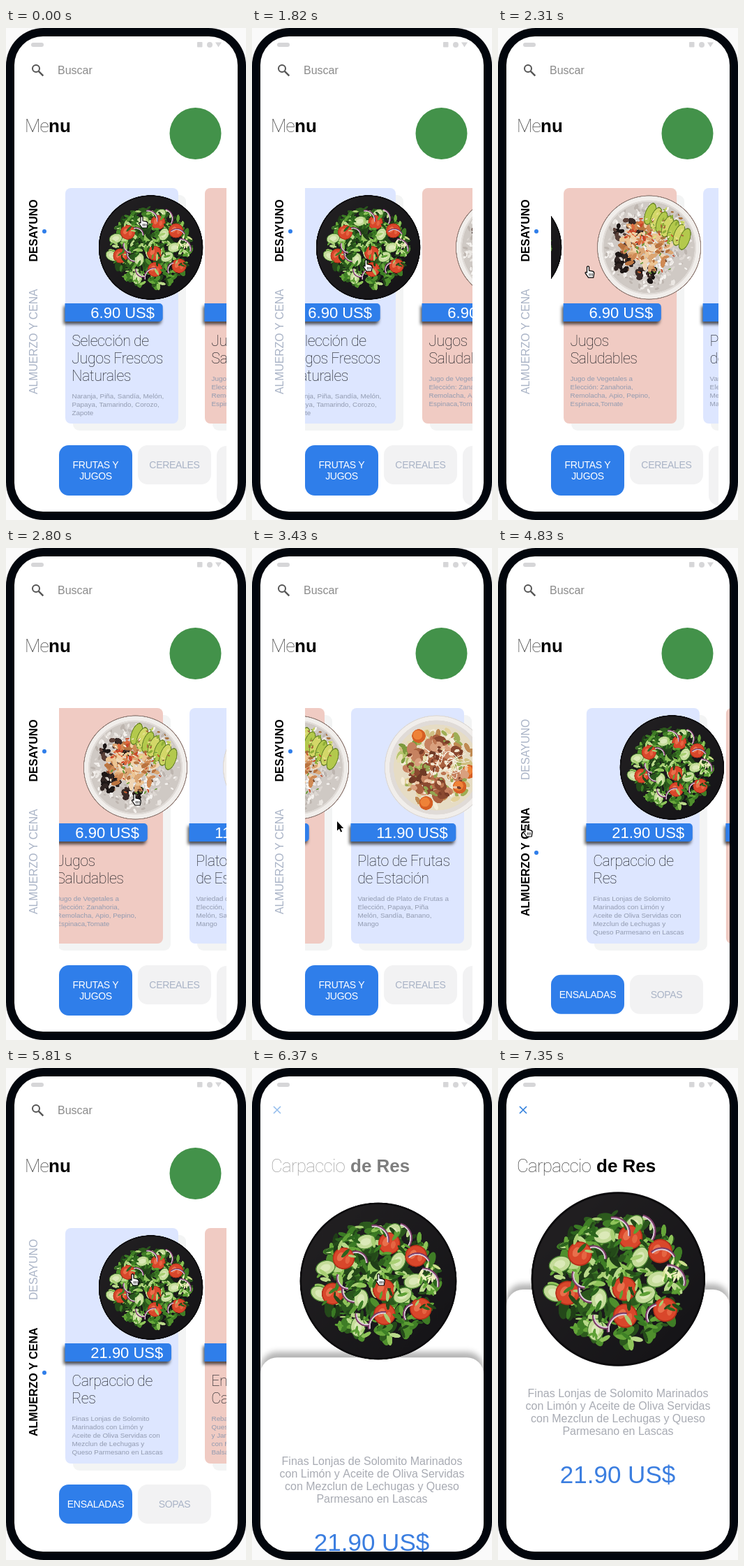
These frames come from a looping animation (344x704 px, 7420 ms). An HTML page with a canvas:

```html
<!DOCTYPE html>
<html lang="es">
<head>
<meta charset="utf-8">
<style>
html, body { margin: 0; width: 100%; height: 100%; overflow: hidden; background: #fff; }
canvas { display: block; width: 344px; height: 704px; }
</style>
</head>
<body>
<canvas id="stage"></canvas>
<script>
const LOOP = 7420, STEP = 70;
const SANS = '"Liberation Sans", Arial, sans-serif';
const THIN = 'Roboto, "Liberation Sans", sans-serif';
const BLUE = '#2f7eea', MUTED = '#a9b3c6', SKY = '#dde6ff', ROSE = '#f0cbc3';

const stage = document.getElementById('stage');
const dpr = window.devicePixelRatio || 1;
stage.width = 344 * dpr;
stage.height = 704 * dpr;
const ctx = stage.getContext('2d');

// ---------- helpers ----------
const clamp = v => Math.max(0, Math.min(1, v));
const mix = (a, b, p) => a + (b - a) * p;
const easeOut = p => 1 - (1 - clamp(p)) ** 3;

// Monotone curve through [time, value] points.
function curve(pts, t) {
  const last = pts.length - 1;
  if (t <= pts[0][0]) return pts[0][1];
  if (t >= pts[last][0]) return pts[last][1];
  const rate = i => (pts[i + 1][1] - pts[i][1]) / (pts[i + 1][0] - pts[i][0]);
  const slope = i => {
    if (i === 0 || i === last) return 0;
    const a = rate(i - 1), b = rate(i);
    return a * b <= 0 ? 0 : 2 * a * b / (a + b);
  };
  let i = 0;
  while (pts[i + 1][0] < t) i++;
  const w = pts[i + 1][0] - pts[i][0], u = (t - pts[i][0]) / w;
  return mix(pts[i][1], pts[i + 1][1], u * u * (3 - 2 * u)) +
    w * u * (1 - u) * ((1 - u) * slope(i) - u * slope(i + 1));
}

function random(seed) {
  return () => (seed = (seed * 16807) % 2147483647) / 2147483647;
}

function disc(g, x, y, r, fill) {
  g.fillStyle = fill;
  g.beginPath();
  g.arc(x, y, r, 0, 7);
  g.fill();
}

function blob(g, x, y, rx, ry, turn, fill) {
  g.fillStyle = fill;
  g.beginPath();
  g.ellipse(x, y, rx, ry, turn, 0, 7);
  g.fill();
}

function arc(g, x, y, r, from, to, color, width) {
  g.strokeStyle = color;
  g.lineWidth = width;
  g.beginPath();
  g.arc(x, y, r, from, to);
  g.stroke();
}

function box(x, y, w, h, r, fill) {
  ctx.fillStyle = fill;
  ctx.beginPath();
  ctx.roundRect(x, y, w, h, r);
  ctx.fill();
}

function text(str, x, y, font, fill, align = 'left', spacing = '0px') {
  ctx.font = font;
  ctx.fillStyle = fill;
  ctx.textAlign = align;
  ctx.letterSpacing = spacing;
  ctx.fillText(str, x, y);
}

function layer(alpha, draw) {
  if (alpha <= 0) return;
  ctx.save();
  ctx.globalAlpha *= Math.min(1, alpha);
  draw();
  ctx.restore();
}

// ---------- dishes, drawn once in a circle of radius 100 ----------
function makeDish(paint, seed) {
  const c = document.createElement('canvas');
  c.width = c.height = 500;
  const g = c.getContext('2d');
  g.translate(250, 250);
  g.scale(2.5, 2.5);
  g.lineCap = 'round';
  const rnd = random(seed);
  const pick = list => list[Math.floor(rnd() * list.length)];
  const scatter = (n, x, y, spread, size, flat, colors) => {
    for (let i = 0; i < n; i++) {
      const a = rnd() * 6.283, d = Math.sqrt(rnd()) * spread, s = size * (.6 + rnd() * .7);
      blob(g, x + Math.cos(a) * d, y + Math.sin(a) * d, s, s * flat, rnd() * 3.14, pick(colors));
    }
  };
  paint(g, rnd, scatter);
  return c;
}

function paintSalad(g, rnd, scatter) {
  const rim = g.createLinearGradient(-70, -70, 70, 70);
  rim.addColorStop(0, '#211f21');
  rim.addColorStop(1, '#161518');
  disc(g, 0, 0, 99.8, '#0c0b0d');
  disc(g, 0, 0, 97.5, rim);
  scatter(110, 0, 0, 74, 10, .5, ['#2c5a1d', '#3f7d26', '#24481a', '#4f8f2d']);
  scatter(190, 0, 0, 77, 7, .4, ['#3a7a24', '#66a63a', '#8fc45a', '#2a551d', '#b9d98a', '#1f3d17']);
  const slices = [[-16, -50], [25, -25], [-67, -17], [-74, 16], [-22, 23], [31, 18], [45, 0], [-26, 58], [18, -62]];
  for (const [x, y] of slices) {
    const turn = rnd() * 3;
    blob(g, x, y, 13, 9.5, turn, '#4c8532');
    blob(g, x, y, 11.8, 8.4, turn, '#c5dc9a');
    blob(g, x, y, 6.5, 4.5, turn, '#dbe9b8');
  }
  const tomatoes = [[14, -48], [-44, -29], [7, 11], [-58, 16], [54, 35], [8, 42], [48, -32]];
  for (const [x, y] of tomatoes) {
    disc(g, x, y, 14, '#b5301a');
    disc(g, x, y, 12.6, '#d9472b');
    blob(g, x - 4, y - 2, 4, 6, .5, '#e8704c');
    blob(g, x + 5, y + 2, 3, 5, .2, '#e56542');
  }
  scatter(95, 0, 0, 76, 6, .32, ['#3d8026', '#5da035', '#2c641e', '#a9cf74', '#244a19']);
  scatter(16, 66, -6, 16, 5, .3, ['#eef0bd', '#cfe08f']);
  for (let i = 0; i < 10; i++) {
    const a = i * .628 + rnd() * .3, d = 32 + rnd() * 34, from = rnd() * 6;
    const x = Math.cos(a) * d, y = Math.sin(a) * d, r = 14 + rnd() * 7;
    arc(g, x, y, r, from, from + 1.8, '#7b3a66', 1.8);
    arc(g, x, y, r - 1.5, from, from + 1.8, '#dccbd8', 1.6);
  }
}

function paintPlate(g, edge) {
  disc(g, 0, 0, 99.5, edge);
  disc(g, 0, 0, 98, '#f1eeeb');
  disc(g, 0, 0, 90, '#e0dbd7');
}

function paintRice(g, rnd, scatter) {
  paintPlate(g, '#8d7871');
  disc(g, 0, 0, 87, '#cfc9c4');
  scatter(330, 0, 0, 83, 4.5, .5, ['#ebe7e3', '#ddd7d2', '#bdb5af', '#f4f1ee']);
  scatter(34, -40, -26, 27, 5.5, .75, ['#1d1716', '#3a2a27', '#5a4038']);
  scatter(26, -50, 28, 17, 5.5, .75, ['#1d1716', '#302523']);
  scatter(22, -6, 50, 18, 5.5, .75, ['#1d1716', '#3a2a27']);
  scatter(120, -4, -4, 48, 8, .45, ['#dba673', '#ecc493', '#cf8a54', '#f0d6b4', '#b9733f']);
  scatter(28, -22, -26, 24, 5, .5, ['#c9462a', '#dd6a3d', '#f0cfa6']);
  for (let i = 0; i < 7; i++) {
    const x = 2 + i * 11, y = -64 + i * 8;
    blob(g, x, y, 10, 22, .35, '#6f8a2c');
    blob(g, x, y, 8.5, 20, .35, i % 2 ? '#d3d768' : '#b3c94c');
  }
  scatter(40, 36, -40, 34, 3.5, .5, ['#8fae38', '#e2df86', '#a9713c', '#c3d25c']);
  scatter(60, 0, 0, 58, 3, .4, ['#6c9a3d', '#c9502f', '#f8ecd6', '#7a4a2c']);
}

function paintPoke(g, rnd, scatter) {
  paintPlate(g, '#dcd8d5');
  disc(g, 0, 0, 82, '#e6dcc4');
  scatter(110, 0, 0, 74, 8, .5, ['#e3d19a', '#f4ecd8', '#9fae55', '#d0c083', '#c08a52']);
  scatter(30, -46, -26, 26, 8, .5, ['#7d9a3e', '#b6c56d', '#e7dfb4']);
  for (const [x, y] of [[44, 37], [-20, 68], [-34, -60], [62, 8]]) {
    disc(g, x, y, 13, '#d65f24');
    disc(g, x - 2, y - 2, 9, '#ee8238');
  }
  scatter(60, -6, 0, 56, 11, .75, ['#a9603f', '#c68260', '#8a4930', '#d9a07e', '#6f3a26']);
  scatter(90, -2, 2, 60, 4.5, .6, ['#bd7652', '#7a3d28', '#ecc3a2', '#93a550', '#f1e6cf']);
  g.strokeStyle = '#f8f3e6';
  g.lineWidth = 1.3;
  for (let i = 0; i < 30; i++) {
    const x = rnd() * 60 - 20, y = rnd() * 50 - 32;
    g.beginPath();
    g.moveTo(x, y);
    g.quadraticCurveTo(x + 8, y - 14 + rnd() * 28, x + rnd() * 44 - 14, y + rnd() * 30 - 15);
    g.stroke();
  }
}

const salad = makeDish(paintSalad, 71);
const rice = makeDish(paintRice, 23);
const poke = makeDish(paintPoke, 47);

function drawDish(img, x, y, r) {
  ctx.drawImage(img, x - r, y - r, r * 2, r * 2);
}

// ---------- content ----------
const breakfast = [
  { bg: SKY, dish: salad, price: '6.90 US$', title: ['Selección de', 'Jugos Frescos', 'Naturales'],
    desc: ['Naranja, Piña, Sandía, Melón,', 'Papaya, Tamarindo, Corozo,', 'Zapote'] },
  { bg: ROSE, dish: rice, price: '6.90 US$', title: ['Jugos', 'Saludables'],
    desc: ['Jugo de Vegetales a', 'Elección: Zanahoria,', 'Remolacha, Apio, Pepino,', 'Espinaca,Tomate'] },
  { bg: SKY, dish: poke, price: '11.90 US$', title: ['Plato de Frutas', 'de Estación'],
    desc: ['Variedad de Plato de Frutas a', 'Elección, Papaya, Piña', 'Melón, Sandía, Banano,', 'Mango'] }
];
const lunch = [
  { bg: SKY, dish: salad, price: '21.90 US$', title: ['Carpaccio de', 'Res'],
    desc: ['Finas Lonjas de Solomito', 'Marinados con Limón y', 'Aceite de Oliva Servidas con',
      'Mezclun de Lechugas y', 'Queso Parmesano en Lascas'] },
  { bg: ROSE, dish: rice, price: '18.90 US$', title: ['Ensalada', 'Caprese'],
    desc: ['Rebanadas de Tomate,', 'Queso Mozzarella', 'y Jardín de Albahaca', 'con Reducción de', 'Balsámico'] }
];

function drawCard(c, x, showDish) {
  box(x + 11, 239, 162, 337, 9, 'rgba(30,40,50,.05)');
  box(x, 229, 162, 337, 8, c.bg);
  if (showDish) drawDish(c.dish, x + 122.5, 314, 75);

  ctx.font = '22px ' + SANS;
  ctx.letterSpacing = '0px';
  const w = ctx.measureText(c.price).width + 48;
  ctx.save();
  ctx.shadowColor = 'rgba(0,0,0,.65)';
  ctx.shadowBlur = 4 * dpr;
  ctx.shadowOffsetX = -2 * dpr;
  ctx.shadowOffsetY = 4 * dpr;
  box(x - .5, 394, w + .5, 26, [0, 5, 5, 0], BLUE);
  ctx.restore();
  text(c.price, x + 36.3, 415, '22px ' + SANS, '#fff');

  c.title.forEach((s, i) => text(s, x + 9.3, 455 + i * 25, '200 21.5px ' + THIN, '#15171c', 'left', '-0.5px'));
  const top = 455 + c.title.length * 25;
  c.desc.forEach((s, i) => text(s, x + 9.5, top + i * 12, '9.9px ' + SANS, '#929bb0'));
}

function drawCarousel(cards, shift, scroll, hideFirst) {
  ctx.save();
  ctx.beginPath();
  ctx.rect(76 + shift, 220, 240, 364);
  ctx.clip();
  cards.forEach((c, i) => {
    const x = 85 + i * 200 + shift - scroll;
    if (x < 344 && x > -180) drawCard(c, x, !(hideFirst && i === 0));
  });
  ctx.restore();
}

function drawChip(x, y, h, lines, active) {
  box(x, y, 105, h, 14, active ? BLUE : '#f2f2f3');
  lines.forEach((s, i) => text(s, x + 52.5, y + h / 2 + 5 + (i - (lines.length - 1) / 2) * 16,
    '14px ' + SANS, active ? '#fff' : MUTED, 'center', '-0.3px'));
}

function drawBreakfastChips() {
  ctx.save();
  ctx.beginPath();
  ctx.rect(75, 590, 241, 102);
  ctx.clip();
  drawChip(76, 597, 72, ['FRUTAS Y', 'JUGOS'], true);
  drawChip(189, 597, 56, ['CEREALES'], false);
  drawChip(302, 598, 85, [], false);
  ctx.restore();
}

function drawLunchChips(drop) {
  drawChip(76, 596 + drop, 56, ['ENSALADAS'], true);
  drawChip(189, 596 + drop, 56, ['SOPAS'], false);
}

function sideLabel(str, y, active) {
  ctx.save();
  ctx.translate(44.5, y);
  ctx.rotate(-Math.PI / 2);
  text(str, 0, 0, (active ? 'bold 16px ' : '15.75px ') + SANS, active ? '#000' : MUTED);
  ctx.restore();
}

function drawSide(onLunch) {
  sideLabel('DESAYUNO', onLunch ? 332 : 334.5, !onLunch);
  sideLabel('ALMUERZO Y CENA', onLunch ? 527 : 524, onLunch);
  disc(ctx, 55, onLunch ? 436 : 291, 3, BLUE);
}

function heading(thin, bold, boldX) {
  text(thin, 27, 149, '100 26px ' + THIN, '#3c3c3c', 'left', '-0.8px');
  text(bold, boldX, 149, 'bold 26px ' + SANS, '#000');
}

function drawHeader() {
  arc(ctx, 43, 58, 5, 0, 7, '#555', 2);
  ctx.beginPath();
  ctx.moveTo(46.8, 61.8);
  ctx.lineTo(53.3, 68.3);
  ctx.lineWidth = 2.4;
  ctx.stroke();
  text('Buscar', 74, 66, '16px ' + SANS, '#8b8b8b');
  heading('Me', 'nu', 61);
  disc(ctx, 271.5, 151, 37, '#43924a');
}

function drawStatus() {
  box(36, 21, 18, 6, 3, '#d6d6d8');
  box(274, 20, 7.5, 7.5, 1, '#d6d6d8');
  disc(ctx, 292, 24, 4, '#d6d6d8');
  ctx.beginPath();
  ctx.moveTo(300, 20.5);
  ctx.lineTo(309, 20.5);
  ctx.lineTo(304.5, 27.5);
  ctx.fill();
}

function drawDetail(p) {
  ctx.save();
  ctx.shadowColor = 'rgba(0,0,0,.3)';
  ctx.shadowBlur = 9 * dpr;
  ctx.shadowOffsetY = -8 * dpr;
  box(12, mix(712, 317, p), 320, 420, 24, '#fff');
  ctx.restore();

  const fade = p * 2 - 1, drop = (1 - p) * 395;
  layer(fade, () => {
    ctx.strokeStyle = '#2f7fdc';
    ctx.lineWidth = 1.6;
    ctx.beginPath();
    ctx.moveTo(31, 55);
    ctx.lineTo(41, 65);
    ctx.moveTo(41, 55);
    ctx.lineTo(31, 65);
    ctx.stroke();
    heading('Carpaccio', 'de Res', 141);
  });
  ['Finas Lonjas de Solomito Marinados', 'con Limón y Aceite de Oliva Servidas',
    'con Mezclun de Lechugas y Queso', 'Parmesano en Lascas'].forEach((s, i) =>
    text(s, 172, 471 + i * 18 + drop, '16px ' + SANS, '#a8abb3', 'center'));
  text('21.90 US$', 171.5, 594 + drop, '35px ' + SANS, '#3b7ee0', 'center');
  drawDish(salad, mix(207.5, 172.3, p), mix(314, 302, p), mix(75, 125, p));
}

// ---------- pointer ----------
const HAND = new Path2D('M-4-7.5q1.5-1.5 3 0V-2l4.5.8q3 .6 2.7 3.4L5.2 8H-2L-6.5 1.5q.3-2 2.5-.5Z');
const ARROW = new Path2D('M-4-8V5.5L-1 2.8 1.2 7.6 3.2 6.7 1.1 2.1H5.2Z');

function drawPointer(x, y, hand) {
  ctx.save();
  ctx.translate(x, y);
  ctx.lineJoin = 'round';
  ctx.lineWidth = 1.2;
  ctx.fillStyle = hand ? '#fff' : '#000';
  ctx.strokeStyle = hand ? '#000' : '#fff';
  const path = hand ? HAND : ARROW;
  if (!hand) ctx.stroke(path);
  ctx.fill(path);
  if (hand) {
    ctx.stroke(path);
    ctx.fillStyle = '#000';
    for (const fx of [-1, 1.2, 3.4]) ctx.fillRect(fx, 2, .8, 3.6);
  }
  ctx.restore();
}

// ---------- motion ----------
const scrollPath = [[1400, 0], [1820, 41], [2400, 200], [2650, 201], [2800, 222], [3250, 343]];
const pointerX = [[1050, 197], [1400, 207], [1820, 166], [2150, 100], [2600, 209], [2800, 187],
  [3200, 132], [3430, 126], [4200, 43], [4900, 43], [5740, 184]];
const pointerY = [[1050, 278], [1400, 335], [1820, 340], [2150, 345], [2600, 357], [2800, 360],
  [3200, 390], [3430, 399], [4200, 405], [4900, 405], [5740, 303]];

function draw(t) {
  const scroll = curve(scrollPath, t);
  const swap = easeOut((t - 4480) / 750);
  const open = easeOut((t - 6090) / 750);
  const onLunch = swap > 0;
  const shift = (1 - swap) * 276;

  ctx.setTransform(dpr, 0, 0, dpr, 0, 0);
  box(0, 0, 344, 704, 0, '#fafafa');
  box(0, 0, 344, 704, 54, '#02060d');
  ctx.save();
  box(12, 12, 320, 680, 41, '#fff');
  ctx.clip();
  drawStatus();

  layer(1 - open * 2, () => {
    drawHeader();
    drawSide(onLunch);
    layer(1 - swap * 2, () => {
      drawCarousel(breakfast, 0, scroll, false);
      drawBreakfastChips();
    });
    if (onLunch) {
      drawCarousel(lunch, shift, 0, open > 0);
      drawLunchChips((1 - swap) * 98);
    }
  });
  if (open > 0) drawDetail(open);

  if (open < .8) {
    const x = curve(pointerX, t), y = curve(pointerY, t);
    const left = onLunch ? 85 + shift : 85 - scroll;
    const rel = x - left;
    const overCard = x > 76 && x < 316 && rel >= 0 && rel % 200 < 162;
    drawPointer(x, y, overCard || x < 50);
  }
  ctx.restore();
}

const start = performance.now();
function tick() {
  const t = (performance.now() - start) % LOOP;
  draw(Math.floor(t / STEP) * STEP);
  requestAnimationFrame(tick);
}
tick();
</script>
</body>
</html>
```
